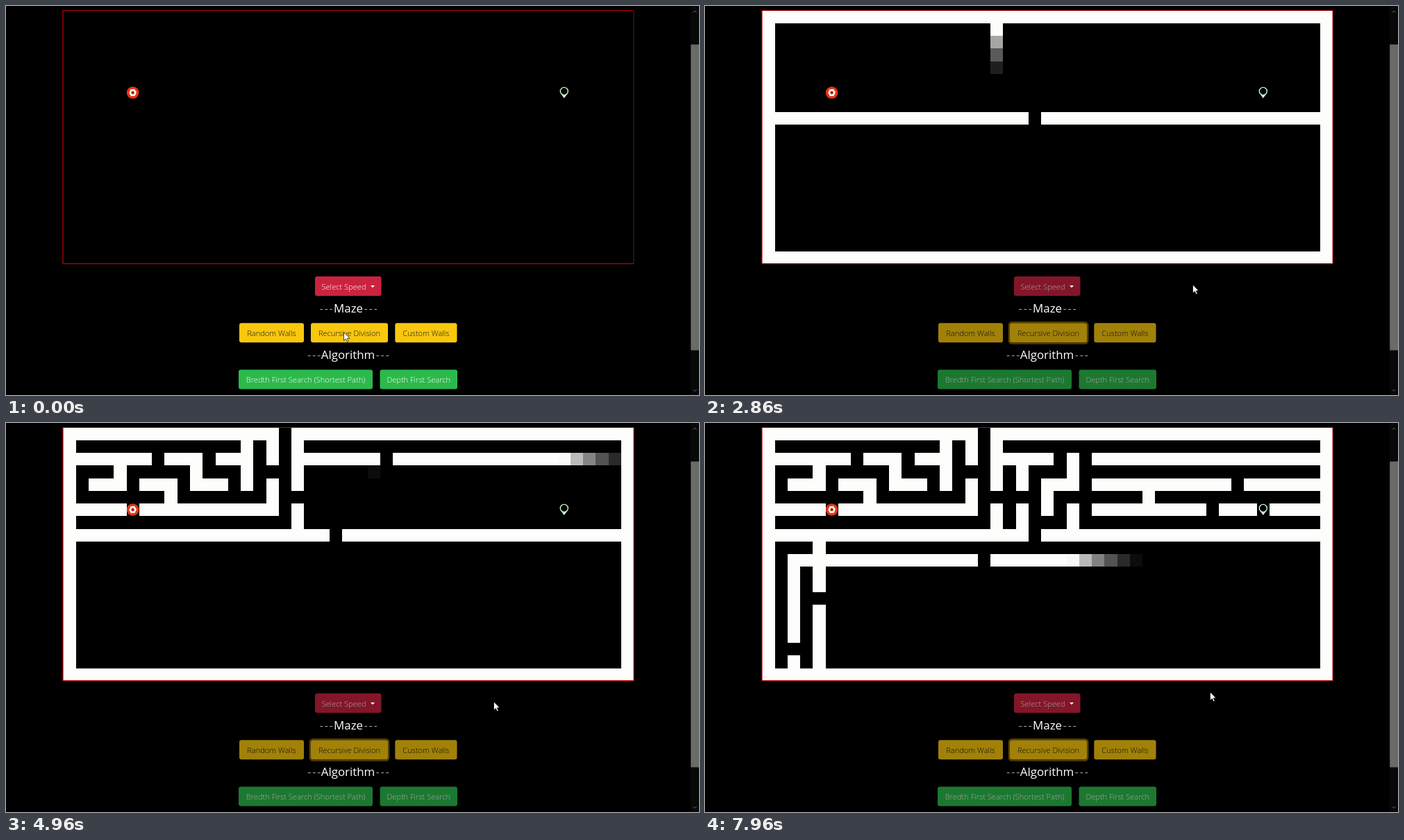
Recreate the animation shown at these times as an HTML page with a canvas. Size 998 by 561 pixels, loop 8 s.

```html
<!DOCTYPE html>
<html lang="en">
<head>
<meta charset="utf-8">
<title>Maze generator</title>
<style>
  html, body { margin: 0; width: 100%; height: 100%; overflow: hidden; background: #000; }
  canvas, svg { position: absolute; left: 0; top: 0; width: 998px; height: 561px; display: block; }
  text { font-family: "Open Sans", "Noto Sans", sans-serif; text-anchor: middle; fill: #fff; }
  .button text { font-size: 11.1px; font-weight: 300; }
  .yellow text { fill: #14140c; }
  .red rect { fill: #ca2340; }
  .yellow rect { fill: #f9c70e; }
  .green rect { fill: #2cb94b; }
  .heading { font-size: 16.9px; }
  .dashes { font-size: 16.9px; font-weight: 300; letter-spacing: 1.6px; }
  .busy .button { opacity: .65; }
  #focus { visibility: hidden; }
  .busy #focus { visibility: visible; }
</style>
</head>
<body>
<canvas id="grid" width="998" height="561"></canvas>
<svg id="page" viewBox="0 0 998 561">
  <g fill="none" stroke="#c0000c" stroke-width="1.2">
    <path d="M904 6.5H82V371.7H904"/>
    <path id="edge" d="M904 6.5V371.7" stroke="#30283a"/>
  </g>

  <g>
    <circle cx="182.6" cy="125" r="8.8" fill="#e8350d"/>
    <path d="M179.5 120.2 185 119.8 188 124.6 185.6 129.8 180 130 177.4 125.2Z" fill="#fff"/>
    <circle cx="182.6" cy="125" r="2.2" fill="#a3200a"/>
  </g>
  <g>
    <path d="M798.3 125.5 803.8 133 809.3 125.5Q803.8 131 798.3 125.5Z" fill="#c9f8d2"/>
    <circle cx="803.8" cy="122.9" r="5.5" fill="#000" stroke="#c9f8d2" stroke-width="1.4"/>
  </g>

  <g id="buttons"></g>
  <path d="M525 403h6l-3 3.2z" fill="#fff"/>

  <text class="heading" x="493" y="442">Maze</text>
  <text class="dashes" x="462" y="442">---</text>
  <text class="dashes" x="526" y="442">---</text>
  <text class="heading" x="492.5" y="509">Algorithm</text>
  <text class="dashes" x="444.5" y="509">---</text>
  <text class="dashes" x="543" y="509">---</text>

  <rect x="986" width="12" height="561" fill="#080808"/>
  <rect x="986.2" y="55.5" width="11.8" height="441" fill="#6a6a68"/>
  <path d="M989.5 9.5 992 7 994.5 9.5M989.5 553 992 555.5 994.5 553" fill="none" stroke="#666"/>

  <path id="cursor" d="M0 0V12L2.8 9.5 4.8 13.8 6.7 12.9 4.8 8.8H8.5Z" fill="#fff" stroke="#000" stroke-width=".7"/>
</svg>
<script>
const LOOP = 8000, START = 500, FADE = 125;
const CELL = 18.26, LEFT = 82.4, TOP = 6.6, COLS = 45, ROWS = 20;
const page = document.getElementById('page');
const cursor = document.getElementById('cursor');
const edge = document.getElementById('edge');
const ctx = document.getElementById('grid').getContext('2d');

function button(color, x, y, width, label, textX = x + width / 2, focused = false) {
  const ring = focused
    ? `<rect id="focus" x="${x - 1.2}" y="${y - 1.2}" width="${width + 2.4}" height="30.4" rx="4"
        style="fill:none;stroke:#806104;stroke-width:2.4"/>` : '';
  return `<g class="button ${color}"><rect x="${x}" y="${y}" width="${width}" height="28" rx="3"/>${ring}
    <text x="${textX}" y="${y + 18.7}">${label}</text></g>`;
}
document.getElementById('buttons').innerHTML = [
  button('red', 445, 390, 95.5, 'Select Speed', 486.5),
  button('yellow', 336, 457.3, 93, 'Random Walls'),
  button('yellow', 439, 457.3, 111, 'Recursive Division', 494.5, true),
  button('yellow', 560.3, 457.3, 89.2, 'Custom Walls'),
  button('green', 335, 524.5, 193, 'Bredth First Search (Shortest Path)'),
  button('green', 538.5, 524.5, 111.5, 'Depth First Search')
].join('');

// Every slot of the build order takes one beat; gaps leave their slot empty.
const events = [];
let slot = 0;
const put = (r, c, wall = true) => events.push({ r, c, wall, slot });
const isMarker = (r, c) => r === 6 && (c === 5 || c === 39);
function row(r, from, to, gap) {
  for (let c = from; c <= to; c++, slot++) if (c !== gap && !isMarker(r, c)) put(r, c);
}
function col(c, from, to, gap) {
  for (let r = from; r <= to; r++, slot++) if (r !== gap) put(r, c);
}
function open(r, c) { put(r, c, false); slot++; }

for (let c = 0; c < COLS; c++, slot++) { put(0, c); put(ROWS - 1, c); }
for (let r = 1; r < ROWS - 1; r++, slot++) { put(r, 0); put(r, COLS - 1); }
row(8, 1, 43, 21);
col(18, 1, 7, 5);
row(6, 1, 17, 17);
col(14, 1, 5, 5);
row(2, 1, 13, 7);
col(8, 3, 5, 3);
col(4, 3, 5, 5);
row(4, 1, 3, 1);
row(4, 5, 7, 5);
open(2, 11);
col(10, 3, 5, 5);
row(4, 11, 13, 13);
open(0, 17);
col(16, 1, 5, 3);
row(2, 19, 43, 25);
col(24, 3, 7, 5);
col(20, 3, 7, 5);
open(2, 23);
row(4, 21, 23, 21);
col(22, 5, 7, 7);
row(4, 25, 43, 25);
col(30, 5, 7, 7);
row(6, 25, 29, 25);
open(4, 37);
row(6, 31, 43, 35);
col(4, 9, 18, 13);
row(10, 1, 3, 1);
col(2, 11, 18, 17);
row(10, 5, 43, 17);

// Piecewise linear lookup over [position, value] keys.
function lerpKeys(keys, x, index = 1) {
  let i = 1;
  while (i < keys.length - 1 && x > keys[i][0]) i++;
  const a = keys[i - 1], b = keys[i];
  return a[index] + (b[index] - a[index]) * (x - a[0]) / (b[0] - a[0]);
}
const pace = [[0, START], [64, 1800], [65, 1930], [106, 2735], [109, 2830], [159, 4025], [161, 4145],
  [198, 4945], [241, 5835], [242, 5935], [277, 7430], [301, 7945]];
for (const e of events) e.time = lerpKeys(pace, e.slot);

const pointer = [[0, 486.5, 470.5], [600, 486.5, 470.5], [1930, 610, 419], [2500, 702.5, 402],
  [5100, 702.5, 402], [5700, 727.5, 383], [7000, 727.5, 383], [7500, 727.5, 388], [LOOP, 727.5, 388]];

function drawCell({ r, c, wall }, alpha) {
  const x = Math.round(LEFT + c * CELL), y = Math.round(TOP + r * CELL);
  ctx.globalAlpha = alpha;
  ctx.fillStyle = wall ? '#fdfdfb' : '#000';
  ctx.fillRect(x, y, Math.round(LEFT + (c + 1) * CELL) - x, Math.round(TOP + (r + 1) * CELL) - y);
}

function render(t) {
  ctx.clearRect(0, 0, 998, 561);
  for (const e of events) {
    if (t > e.time) drawCell(e, Math.min(1, (t - e.time) / FADE) ** 1.5);
  }
  page.classList.toggle('busy', t >= START);
  edge.setAttribute('stroke', t >= 1400 ? '#c02840' : '#30283a');
  cursor.setAttribute('transform', `translate(${lerpKeys(pointer, t)} ${lerpKeys(pointer, t, 2)})`);
}

const began = performance.now();
function tick() {
  render((performance.now() - began) % LOOP);
  requestAnimationFrame(tick);
}
tick();
</script>
</body>
</html>
```
